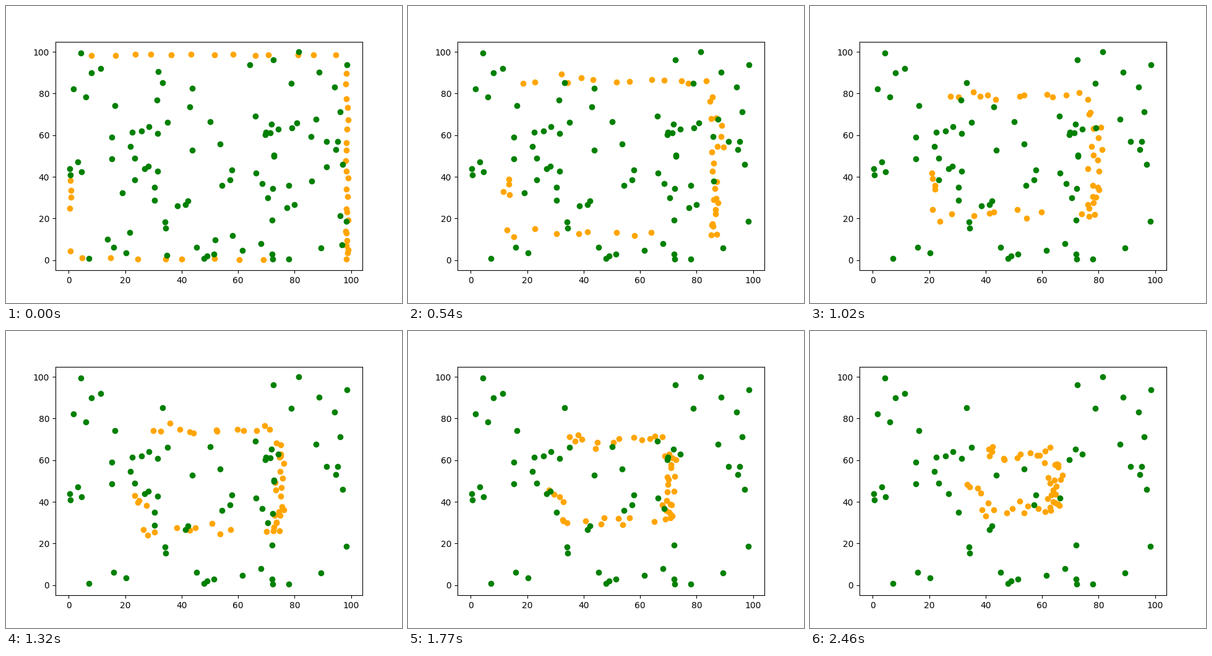
These frames come from a looping animation (640 by 480 pixels, 8 s). A matplotlib script:

```python
import numpy as np
import matplotlib.pyplot as plt
from matplotlib.animation import FuncAnimation

LOOP_MS, INTERVAL_MS, STEP_MS = 8000, 20, 30
LAST_STEP = 82
CENTER = 50
PULL = 0.0157    # share of the way to the centre covered per step
WANDER = 0.35    # random drift per step
MEALS, LAST_MEAL = 36, 70

rng = np.random.default_rng(11)

# Food that is never eaten, in stage pixels.
LASTING = np.array([
    (121, 76), (138, 108), (153, 101), (109, 134), (129, 147), (176, 161),
    (253, 124), (171, 212), (204, 204), (219, 202), (231, 195), (245, 206),
    (261, 188), (201, 227), (208, 246), (171, 247), (224, 263), (116, 252),
    (103, 263), (104, 273), (122, 268), (240, 293), (301, 233), (346, 223),
    (365, 265), (362, 281), (404, 270), (290, 321), (294, 315), (257, 349),
    (258, 359), (174, 390), (194, 399), (134, 408), (308, 390), (320, 408),
    (325, 404), (336, 401), (382, 395), (412, 384), (430, 346), (430, 401),
    (431, 409), (457, 409), (509, 391), (550, 348), (544, 256), (533, 232),
    (518, 219), (536, 219), (540, 171), (531, 131), (506, 107), (551, 95),
    (473, 74), (432, 87), (461, 125), (501, 183), (440, 199), (429, 191),
    (419, 208)])


def to_data(px):
    return np.column_stack([(px[:, 0] - 101.4) / 4.563,
                            (411.0 - px[:, 1]) / 3.365])


def spread(low, high, count, bend=1.0):
    """Slightly uneven places along one side; bend crowds them to one end."""
    places = low + (high - low) * np.linspace(0, 1, count) ** bend
    return np.clip(places + rng.normal(0, 1, count), 0.5, 98.5)


def depth(base, count):
    return base + rng.uniform(0.1, 1, count)


def starting_swarm():
    top = np.column_stack([spread(8, 94, 13), depth(98, 13)])
    right = np.column_stack([depth(98, 23), spread(1, 89, 23, 1.4)])
    bottom = np.column_stack([spread(5, 69, 8), depth(0, 8)])
    left = np.column_stack([depth(0, 5), spread(3.6, 38, 5, 0.4)])
    return np.vstack([top, right, bottom, left])


def swarm_paths():
    paths = [starting_swarm()]
    for _ in range(LAST_STEP):
        here = paths[-1]
        drift = rng.normal(0, WANDER, here.shape)
        paths.append(here + (CENTER - here) * PULL + drift)
    return np.array(paths)


paths = swarm_paths()
lasting = to_data(LASTING)

# Each eaten dot lies where one member of the swarm will pass.
meal_steps = np.linspace(1, LAST_MEAL, MEALS).astype(int)
eaters = rng.choice(paths.shape[1], MEALS, replace=False)
meals = paths[meal_steps, eaters]

fig, ax = plt.subplots(figsize=(6.4, 4.8), dpi=100)
ax.set_xlim(-4.69, 104.0)
ax.set_ylim(-4.933, 104.913)
swarm = ax.scatter(*paths[0].T, color="orange")
food = ax.scatter(*lasting.T, color="green")


def update(frame):
    step = min(frame * INTERVAL_MS // STEP_MS, LAST_STEP)
    swarm.set_offsets(paths[step])
    food.set_offsets(np.vstack([lasting, meals[meal_steps > step]]))
    return swarm, food


anim = FuncAnimation(fig, update, frames=LOOP_MS // INTERVAL_MS,
                     interval=INTERVAL_MS, repeat=True, repeat_delay=0)
plt.show()
```
